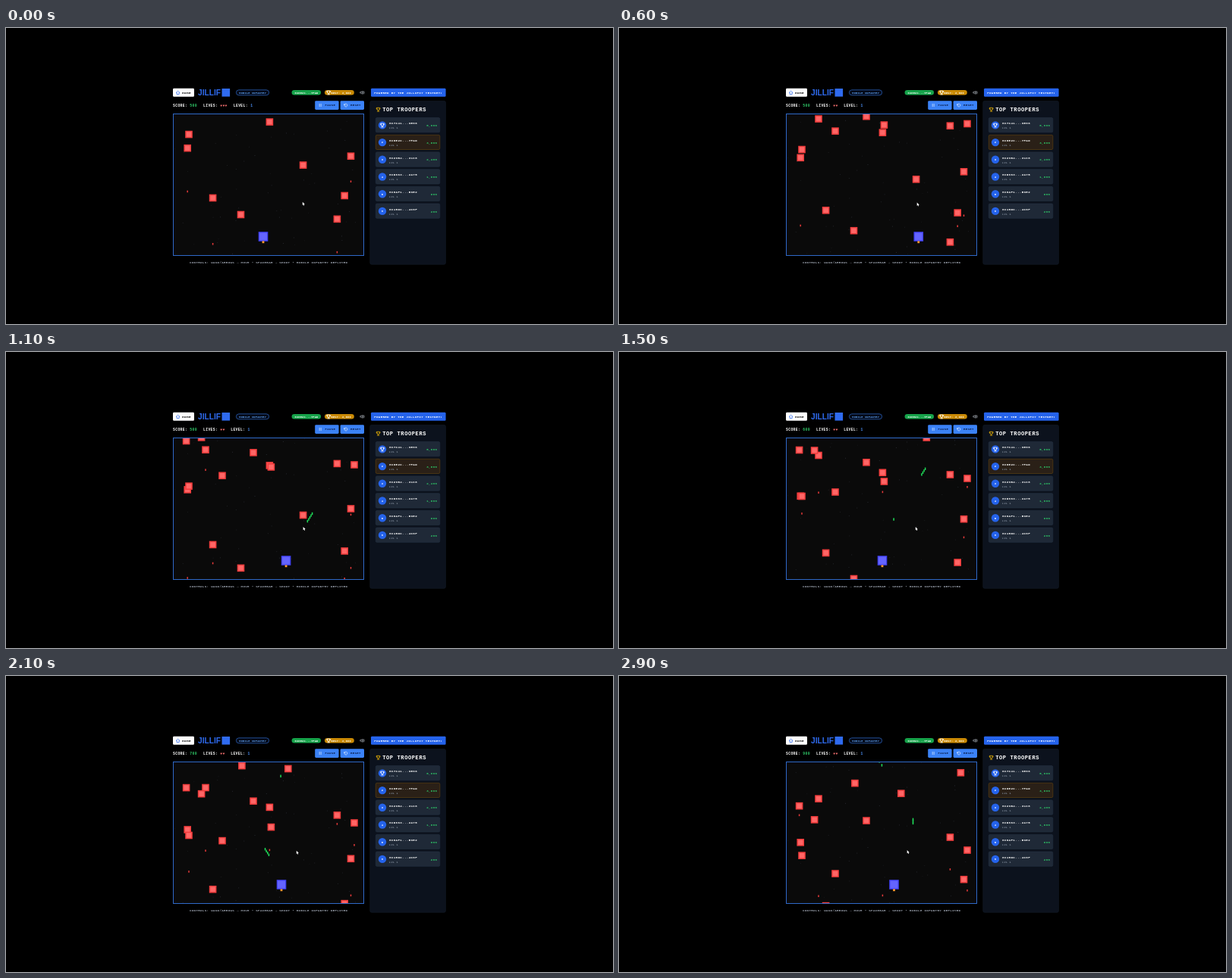
An HTML page with a canvas for the animation above (3 s loop, 800 px wide and 391 px high).

```html
<!DOCTYPE html>
<html lang="en">
<head>
<meta charset="utf-8">
<title>Arcade shooter</title>
<style>
  html, body { margin: 0; width: 100%; height: 100%; overflow: hidden; background: #000; }
  svg, canvas { position: absolute; left: 0; top: 0; width: 800px; height: 391px; }
  text { font: 700 4px "Liberation Mono", "Courier New", monospace; letter-spacing: .08em; white-space: pre; }
  .brand { font: 700 10.2px "Liberation Sans", Arial, sans-serif; letter-spacing: 0; }
  .line { fill: none; stroke-linecap: round; stroke-linejoin: round; stroke-width: .7; }
</style>
</head>
<body>
<svg id="ui" viewBox="0 0 800 391"></svg>
<canvas id="game" width="800" height="391"></canvas>
<script>
const LOOP = 3, STEP = .1; // seconds
const FIELD = { x: 220, y: 113, w: 252, h: 188 };

// ---------- static interface ----------
const box = (x, y, w, h, r, fill, stroke = 'none') =>
  `<rect x="${x}" y="${y}" width="${w}" height="${h}" rx="${r}" fill="${fill}" stroke="${stroke}" stroke-width=".7"/>`;
const label = (x, y, size, fill, str, anchor = 'start') =>
  `<text x="${x}" y="${y}" style="font-size:${size}px" fill="${fill}" text-anchor="${anchor}">${str}</text>`;
const icon = (x, y, color, d) =>
  `<path class="line" transform="translate(${x} ${y})" stroke="${color}" d="${d}"/>`;

const CUP = 'M-1.5-2.3h3v2q0 1.7-1.5 1.7t-1.5-1.7zM-1.5-1.8h-1.1q0 1.8 1.3 1.9M1.5-1.8h1.1q0 1.8-1.3 1.9M0 1.4v1M-1.3 2.5h2.6';
const HOUSE = 'M-2.3 0L0-2.2 2.3 0M-1.6-.4v2.5h3.2v-2.5';
const SPEAKER = 'M-2.3-.8h1L.2-2v4l-1.5-1.2h-1zM1.2-1q.8 1 0 2M2.1-1.8q1.4 1.8 0 3.6';
const BARS = 'M-1-1.7v3.4M1-1.7v3.4';
const TURN = 'M-1.9-1.4v1.4h1.4M-1.7-.2A2 2 0 1 1-1 1.6';

const button = (x, d, name) => box(x, 96.2, 31.4, 11.8, 1.4, '#3b82f6') +
  icon(x + 7, 102, '#dbeafe', d) + label(x + 13.4, 103.4, 4, '#0b1f4d', name);

const troopers = [
  ['0X7C41...9E06', '5,000'], ['0X8E2C...7FAD', '3,800'], ['0X29B4...31C8', '2,400'],
  ['0XD063...2A75', '1,800'], ['0X6AF1...B9E2', '800'], ['0X15DC...4C0F', '200']
];

function trooperRow([name, score], i) {
  const y = 118.6 + i * 22.7, mine = i === 1;
  return box(487.3, y, 84.5, 19.2, 1.6, mine ? '#2a2017' : '#1f2937', mine ? '#5c3f10' : '#233041') +
    `<circle cx="496" cy="${y + 9.8}" r="5.2" fill="#2563eb"/>` +
    (i ? label(496.1, y + 11.1, 3.9, '#fff', i + 1, 'middle') : icon(496, y + 9.8, '#fff', CUP)) +
    label(505, y + 8.6, 4.2, '#fff', name) +
    label(505, y + 14.6, 3.5, '#7d8797', 'LVL 1') +
    label(568.4, y + 11.4, 4.2, '#2fcb69', score, 'end');
}

document.getElementById('ui').innerHTML = [
  box(220, 79.8, 28, 11, 1.4, '#fff'),
  icon(226.6, 85.4, '#2563eb', HOUSE),
  label(232, 86.8, 4.4, '#111', 'HOME'),
  '<text class="brand" x="253" y="89" fill="#2f6bf0">JILLIF</text>',
  box(284.5, 80, 10.6, 10.6, 0, '#2f6bf0'),
  box(303.4, 81.8, 43.2, 7, 3.5, '#040a18', '#2f69c8'),
  label(325.2, 86.5, 3.5, '#60a5fa', 'MOBILE INFANTRY', 'middle'),
  box(376.6, 82, 38.4, 6.6, 3.3, '#16a34a'),
  label(396, 86.5, 3.5, '#fff', '0X8E2C...7FAD', 'middle'),
  box(420, 82, 38.8, 6.6, 3.3, '#ca8a04'),
  icon(425.2, 85.3, '#fff', CUP),
  label(428.6, 86.5, 3.5, '#fff', 'BEST: 3,800'),
  icon(469.5, 85.3, '#a9afb8', SPEAKER),
  box(481, 79.8, 98.6, 11, 1.4, '#2563eb'),
  label(530.3, 86.8, 4.15, '#fff', 'POWERED BY THE JILLIF37 TESTNET!', 'middle'),
  '<text id="status" x="220" y="103.5" style="font-size:4.7px" fill="#fff"></text>',
  button(407.2, BARS, 'PAUSE'),
  button(440.6, TURN, 'RESET'),
  box(479.8, 96.4, 99.6, 215.8, 2, '#0c121d', '#141c28'),
  icon(490.6, 107.6, '#eab308', CUP),
  label(496.2, 109.9, 7.1, '#fff', 'TOP TROOPERS'),
  ...troopers.map(trooperRow),
  label(346.2, 310.7, 4.15, '#9ca3af', 'CONTROLS: WASD/ARROWS → MOVE • SPACEBAR → SHOOT • MOBILE INFANTRY DEPLOYED', 'middle')
].join('');

// ---------- game rules ----------
const MID = LOOP / 2, MUZZLE = 269, SHOT_SPEED = 148, BOMB_SPEED = 75, RELOAD = .017, REACH = 6.1;

// From slowest to fastest: x, y at mid-loop, then the moments it fires.
const enemies = [
  [263, 136.5, .72], [239.2, 190.3, -.97], [347.4, 159.3, 1.1], [450.4, 92], [272.6, 265.4, -1.17, .69],
  [310.9, 101.3], [237.6, 129.5, 2.74], [391.6, 228], [326, 145.8], [241, 190.5, 1.07],
  [454.5, 220.7, -.7, 1.03], [309.5, 299.5], [436.4, 162, 1.93], [446.2, 278, .26], [405.3, 113],
  [371.8, 98], [257.6, 130], [459, 167, 1.29], [349.4, 171], [436.4, 328.5, -1.6], [285, 185]
].map(([x, y, ...fires], i) => {
  const u = i / 10 - 1;
  return { x, y, fires, speed: 34.3 + 10 * u + 2 * u ** 2 + 8 * u ** 3, end: Infinity };
});
const enemyY = (e, t) => e.y + e.speed * (t - MID);

const playerPath = [[0, 339], [.71, 405], [1.34, 347], [1.5, 347], [1.575, 340], [1.812, 340],
  [1.885, 347], [1.93, 347], [2.36, 387.5], [2.41, 387.5], [2.68, 362.5], [LOOP, 362.5]];
const cursorPath = [[0, 390.8], [.6, 392.7], [1.5, 390.8], [2.1, 382.8], [LOOP, 379.3]];

function along(path, t) {
  const i = path.findIndex(p => p[0] > t);
  const [t0, a] = path[i - 1], [t1, b] = path[i];
  return a + (b - a) * (t - t0) / (t1 - t0);
}

// Bursts: first shot and number of shots, each leaving from where the player is.
const shots = [[.725, 5], [1.176, 1], [1.828, 4], [2.362, 3]].flatMap(([start, n]) =>
  Array.from({ length: n }, (_, i) => {
    const born = start + i * RELOAD;
    return { born, x: along(playerPath, born), end: Infinity };
  }));
const shotY = (s, t) => MUZZLE - SHOT_SPEED * (t - s.born);

// A shot and the first enemy in its column remove each other.
for (const s of shots) {
  const hits = enemies
    .filter(e => e.end === Infinity && Math.abs(e.x - s.x) < REACH)
    .map(e => [s.born + (MUZZLE - enemyY(e, s.born) - 5) / (SHOT_SPEED + e.speed), e])
    .filter(([t, e]) => t > s.born && enemyY(e, t) > FIELD.y - 5)
    .sort((a, b) => a[0] - b[0]);
  if (hits.length) s.end = hits[0][1].end = hits[0][0];
}

let seed = 7;
const rand = () => (seed = seed * 16807 % 2147483647) / 2147483647;
const stars = Array.from({ length: 60 }, () => [rand() * FIELD.w, rand() * FIELD.h, .1 + rand() * .15]);

// ---------- drawing ----------
const g = document.getElementById('game').getContext('2d');
const status = document.getElementById('status');
const block = (x, y, w, h, color) => {
  g.fillStyle = color;
  g.fillRect(x - w / 2, y - h / 2, w, h);
};

function drawCursor(x, y) {
  g.fillStyle = '#fff';
  g.fill(new Path2D(`M${x} ${y}v4.4l1-.9.7 1.5.7-.3-.6-1.5h1.3z`));
}

function drawStatus(t) {
  const score = 500 + 100 * enemies.filter(e => e.end <= t).length;
  const lives = t < .3 ? 3 : 2;
  status.innerHTML = `SCORE: <tspan fill="#2fcb69">${score}</tspan>` +
    `<tspan x="260">LIVES: </tspan><tspan x="282.2" fill="#f87171">${'♥'.repeat(lives)}</tspan>` +
    `<tspan x="${289 + 3.6 * lives}">LEVEL: </tspan><tspan fill="#4b8ff5">1</tspan>`;
}

function draw(t) {
  const { x, y, w, h } = FIELD;
  g.clearRect(0, 0, 800, 391);
  g.save();
  g.beginPath();
  g.rect(x, y, w, h);
  g.clip();
  g.fillStyle = '#0a0a0a';
  g.fillRect(x, y, w, h);

  for (const [sx, sy, a] of stars)
    block(x + sx, y + (sy + t * 20) % h, .9, .9, `rgba(150,160,190,${a})`);

  const px = along(playerPath, t);
  block(px, 275.5, 12.6, 12.6, '#4040f5');
  block(px, 275.5, 10, 10, '#6464ff');
  block(px, 282.8, 2.8, 2.8, '#ff9a2e');

  for (const s of shots)
    if (t >= s.born && t < s.end) block(s.x, shotY(s, t), 1.5, 3.4, '#1fe05a');
  for (const e of enemies)
    for (const f of e.fires)
      if (t >= f) block(e.x, enemyY(e, f) + 5 + BOMB_SPEED * (t - f), 1.5, 2.6, '#e83a3a');
  for (const e of enemies) {
    if (t >= e.end) continue;
    block(e.x, enemyY(e, t), 9.6, 9.6, '#f23c3c');
    block(e.x, enemyY(e, t), 6.6, 6.6, '#ff6666');
  }
  drawCursor(along(cursorPath, t), 229.8 + Math.sin(Math.PI * t / LOOP) * 1.2);
  g.restore();

  g.strokeStyle = '#2f69c8';
  g.strokeRect(x + .5, y + .5, w - 1, h - 1);
  drawStatus(t);
}

let last = -1;
function tick() {
  const t = Math.floor(performance.now() / 1000 % LOOP / STEP) * STEP;
  if (t !== last) draw(last = t);
  requestAnimationFrame(tick);
}
tick();
</script>
</body>
</html>
```
